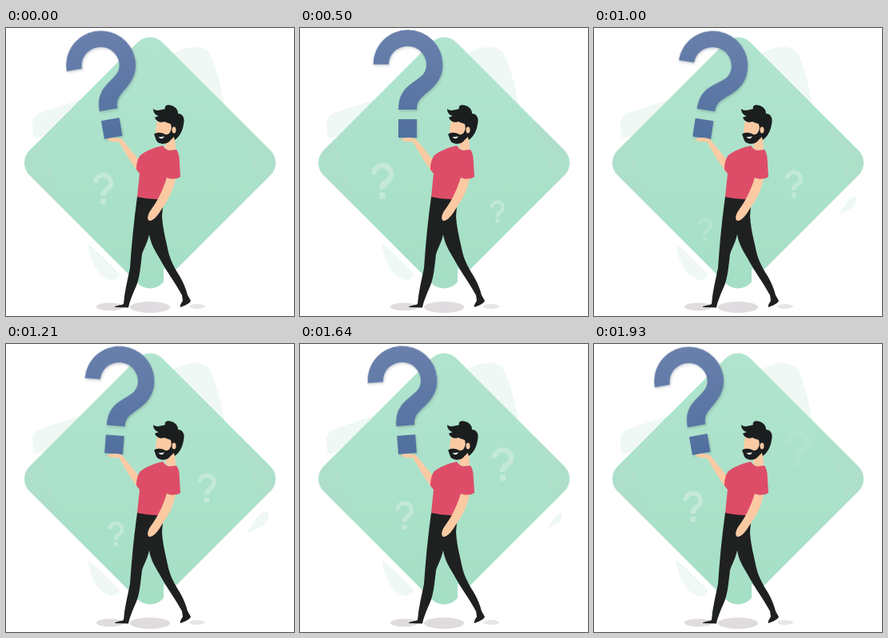
An HTML page that plays this animation: 360 by 360 pixels, repeating every 2000 ms.

```html
<!DOCTYPE html>
<html lang="en">
<head>
<meta charset="utf-8">
<title>Man balancing a question mark</title>
<style>
html, body { margin: 0; width: 100%; height: 100%; overflow: hidden; background: #fff; }
svg { display: block; width: 100vw; height: 100vh; }
#big { filter: drop-shadow(1px 2px 1.5px rgba(40, 60, 70, .2)); }
</style>
</head>
<body>
<svg viewBox="0 0 360 360">
  <defs>
    <linearGradient id="mint" x1="0" y1="0" x2="1" y2="1">
      <stop offset="0" stop-color="#b1e4cf"/>
      <stop offset="1" stop-color="#a4dfc5"/>
    </linearGradient>
    <linearGradient id="blue" x1="0" y1="0" x2="0" y2="1">
      <stop offset="0" stop-color="#6a80ac"/>
      <stop offset="1" stop-color="#51709f"/>
    </linearGradient>
    <rect id="diamond" x="62.6" y="51.1" width="234.8" height="234.8" rx="22" transform="rotate(45 180 168.5)"/>
    <clipPath id="inside"><use href="#diamond"/></clipPath>
    <path id="mark" d="M91.500 45.500A43.500 43.500 0 0 1 178.500 46C178.500 61 171 71 160 80C150 88 146 92 146 102H123C123 84 130 75 144 66C153 60 158 55 158 46A23.500 23 0 0 0 111 45.500ZM123 114H146V137H123Z"/>
  </defs>

  <!-- pale backdrop -->
  <g fill="#eff8f4">
    <path d="M95 89L46 105Q33 109 33 120L34 133Q34 138 39 137L60 130Z"/>
    <path d="M208 32L222 26Q244 19 254 31Q264 48 273 96L230 90Z"/>
    <path d="M102 270Q110 275 118 283L142 307C140 315 133 317 126 313C112 306 106 290 102 270Z"/>
    <path id="leaf" d="M300 237L316 214Q327 206 328 211Q330 220 322 226Q312 234 300 237Z"/>
  </g>
  <use href="#diamond" fill="url(#mint)"/>
  <g clip-path="url(#inside)" fill="#b0deca" opacity=".6">
    <path d="M0 100H28L70 220H0Z"/>
    <path d="M360 237H332L290 117H360Z"/>
  </g>
  <path fill="#fff" d="M197 300L212 310L197 320Z"/>

  <g fill="#e2f1e9">
    <use id="left" href="#mark"/>
    <use id="right" href="#mark"/>
  </g>

  <g fill="#dfdbde">
    <ellipse cx="130" cy="348.500" rx="17" ry="5"/>
    <ellipse cx="180" cy="349" rx="25" ry="7"/>
    <ellipse cx="239" cy="348" rx="10" ry="3" fill="#e6e6e6"/>
  </g>

  <use id="big" href="#mark" fill="url(#blue)"/>

  <!-- man -->
  <g fill="#fbcaa3">
    <path d="M126 139Q136 135 145 139L167 166L164 179Q152 162 141 142Q131 143 126 139Z"/>
    <path d="M189 116L187 128L189 137L200 142L199 150Q205 156 212 151L211 138L212 118Z"/>
  </g>
  <path fill="#1f2121" d="M164 211L197 213L195 235C196 252 200 265 203 280C206 292 212 302 217 310Q224 322 227 334L231 341C229 345 223 347 218 349C217 347 219 344 221 341L220 334C210 316 200 303 192 288C186 278 181 270 179 258C177 268 172 276 170 283C168 300 167 312 163 322C158 333 156 339 154 345L153 349.500L136 349C136 347 143 347 147 345C148 330 152 315 155 300C157 270 160 240 164 211Z"/>
  <path fill="#de4d68" d="M196 147Q199 152 204 153L213 152C216 156 217 162 217 170L218 186C211 190 206 190 201 187L197 214Q180 215 164 211L167 182L163 177C163 168 165 163 168 159C174 154 186 149 196 147Z"/>
  <path fill="#fbcaa3" d="M201 187Q206 190 212 188C209 204 203 214 196 224C190 234 185 241 179 241C176 239 177 234 180 229C188 218 195 206 201 187Z"/>
  <g fill="#1b1e1f">
    <path d="M184 101C187 104 192 103 199 101C197 95 206 95 211 99C214 101 215 104 215 107C221 107 224 113 222 120C221 128 217 136 211 140L208 131L206 120C203 119 200 118 198 117C194 119 188 117 186 112C187 111 189 111 191 110C187 109 184 106 184 101Z"/>
    <path d="M185 133C188 130 194 130 199 133C203 134 206 131 207 124L211 134C209 138 206 139 205 141C202 145 195 146 190 143C187 141 187 136 185 133Z"/>
  </g>
  <ellipse cx="210" cy="127.500" rx="2.500" ry="4" fill="#fbcaa3"/>
  <path fill="#fff" d="M190.500 136.500L198 135.500Q195 140.500 190.500 136.500Z"/>
</svg>
<script>
const LOOP = 2000, STEPS = 28;
const el = id => document.getElementById(id);
const move = (id, transform) => el(id).setAttribute("transform", transform);

// A small mark fades in, grows at a steady rate and fades out over one loop.
function floatMark(id, age, x, y, height) {
  move(id, `translate(${x} ${y}) scale(${height / 134}) translate(-135 -70)`);
  el(id).setAttribute("opacity", .45 * Math.min(1, age / 4, (STEPS - age) / 5));
}

function draw(time) {
  // The motion advances in even steps, 14 a second.
  const step = Math.floor((time % LOOP + 5) * STEPS / LOOP) % STEPS;

  const swing = Math.min(step, STEPS - 1 - step);
  move("big", `rotate(${-10.2 + 1.45 * swing} 133 138)`);

  floatMark("right", step, 244 + .42 * step, 264 - 4.95 * step, 22 + .85 * step);

  const age = (step + 16) % STEPS;
  floatMark("left", age, 139 - .068 * age ** 2, 190 + .107 * (26 - age) ** 2, 27 + .75 * age);

  const size = Math.max(0, Math.sin(Math.PI * (step - 9) / 18));
  move("leaf", `translate(326 217) scale(${size}) translate(-326 -217)`);
}

const start = performance.now();
function tick() {
  draw(performance.now() - start);
  requestAnimationFrame(tick);
}
tick();
</script>
</body>
</html>
```
